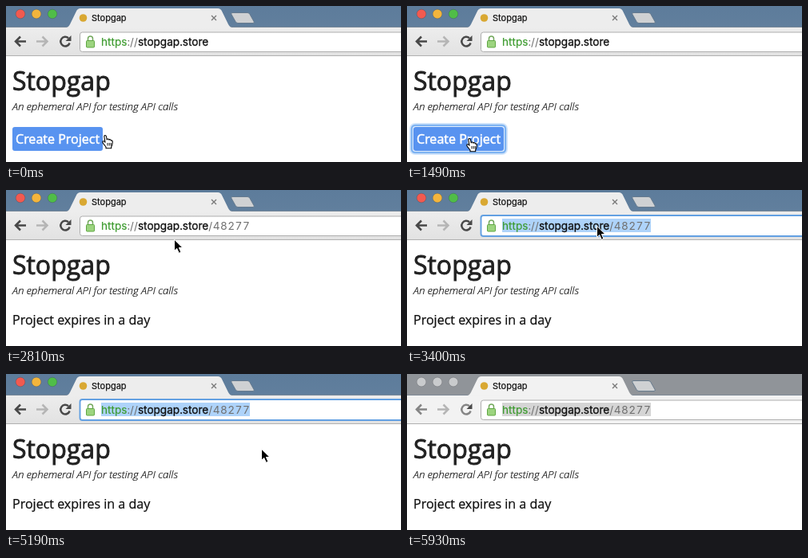
These frames come from a looping animation (494x196 px, 6.03 s). An HTML page:

```html
<!DOCTYPE html>
<html lang="en">
<head>
<meta charset="utf-8">
<title>Stopgap</title>
<style>
  html, body { margin: 0; width: 100%; height: 100%; overflow: hidden; background: #fff; }
  svg { display: block; width: 100%; height: 100%; }
  .ui { font-family: Inter, Roboto, sans-serif; }
  .page { font-family: "Open Sans", "Noto Sans", sans-serif; fill: #111; }
  .line { fill: none; stroke: #484848; stroke-width: 2.5; }
  .light { stroke: #000; stroke-opacity: .16; stroke-width: .9; }
  .idle .line { stroke: #858585; }
  .idle .light { fill: #c9cbcd; }
  .idle #frame { fill: #909499; }
  .idle #tab, .idle #bar { fill: #f2f2f2; }
  .idle #selection { fill: #d5d5d5; }
</style>
</head>
<body>
<svg id="stage" viewBox="0 0 494 196">
  <defs>
    <linearGradient id="sky" x2="0" y2="1">
      <stop stop-color="#5d7c9b"/><stop offset="1" stop-color="#617f9d"/>
    </linearGradient>
    <linearGradient id="chrome" x2="0" y2="1">
      <stop stop-color="#ededed"/><stop offset="1" stop-color="#e2e2e2"/>
    </linearGradient>
  </defs>

  <rect width="494" height="196" fill="#fff"/>
  <rect id="frame" width="494" height="28" fill="url(#sky)"/>
  <circle class="light" cx="18" cy="10" r="5.8" fill="#f25a50"/>
  <circle class="light" cx="38" cy="10" r="5.8" fill="#f3b53c"/>
  <circle class="light" cx="58" cy="10" r="5.8" fill="#50bd48"/>
  <path d="M283 8.5H302Q304 8.5 305 10.5L310 19.5Q311 21.5 309 21.500H290Q288 21.500 287 19.500L282 10.500Q281 8.500 283 8.500Z"
        fill="#cfd1d3" stroke="#60758a" stroke-width=".9"/>

  <rect id="bar" y="27" width="494" height="35" fill="url(#chrome)"/>
  <path d="M0 26.500H494" stroke="#7d8a97" stroke-width=".8"/>
  <path d="M0 62.500H494" stroke="#b0b0b0"/>
  <path id="tab" d="M74 27.500Q78 27 80 23L88 6.500Q89.500 3 93 3H265Q268.500 3 270 6.500L278 23Q280 27 284 27.500Z" fill="#ededed"/>
  <path d="M257 12l6 6m0-6l-6 6" stroke="#777" stroke-width="1.300"/>
  <text class="ui" x="107" y="19" font-size="11" fill="#111" stroke="#111" stroke-width=".2">Stopgap</text>
  <circle id="favicon" cx="96.500" cy="15" r="4.800" fill="#d9a832"/>
  <path id="blankIcon" d="M92.500 8.500h6l3.500 3.500v10h-9.500z" fill="#fff" stroke="#999" stroke-width=".8"/>
  <path id="spinner" d="M95.700 10A5.500 5.500 0 0 1 103.500 15" fill="none" stroke="#8c98b4" stroke-width="1.700"/>

  <path class="line" d="M25 44.500H12M18 38.500l-6 6 6 6"/>
  <path d="M38 44.500H51M45.500 38.500l6 6-6 6" fill="none" stroke="#b5b5b5" stroke-width="2.500"/>
  <g id="reload">
    <path class="line" d="M78 40.300A5.800 5.800 0 1 0 79.600 46.500"/>
    <path d="M81.500 37V44H74.500Z" fill="#484848"/>
  </g>
  <path id="stop" class="line" d="M69.500 39.500l10 10m0-10l-10 10"/>

  <rect id="address" x="92.500" y="33" width="420" height="24.500" rx="3" fill="#fff" stroke="#adadad"/>
  <rect id="focus" x="92.500" y="32" width="420" height="26" rx="3" fill="#fff" stroke="#62a0e2" stroke-width="1.900"/>
  <rect id="selection" x="119" y="36" width="186" height="17" fill="#aed3fa"/>
  <path d="M102.500 44.500V41a3 3 0 0 1 6 0V44.500" fill="none" stroke="#72a85c" stroke-width="1.500"/>
  <rect x="100.500" y="43.500" width="10" height="8.500" rx="1" fill="#9cd47f" stroke="#5fa743"/>
  <text class="ui" x="119" y="50" font-size="13.600" fill="#707070" style="font-variant-numeric:tabular-nums"><tspan fill="#3d9b2f" stroke="#3d9b2f" stroke-width=".2">https</tspan>://<tspan fill="#111" stroke="#111" stroke-width=".3">stopgap.store</tspan><tspan id="path" letter-spacing=".5">/48277</tspan></text>

  <g class="page">
    <text x="8" y="105.500" font-size="32" stroke="#222" stroke-width=".9" fill="#222">Stopgap</text>
    <text x="8" y="131" font-size="13.300" font-weight="300" font-style="italic" fill="#000" stroke="#000" stroke-width=".15">An ephemeral API for testing API calls</text>
    <text id="expiry" x="8" y="168.500" font-size="16.070" stroke="#111" stroke-width=".25"></text>
    <g id="button">
      <g id="ring" fill="none" stroke="#7fb4f2">
        <rect x="5" y="149" width="119" height="36" rx="5" stroke-width="4" opacity=".35"/>
        <rect x="6" y="150" width="117" height="34" rx="4" stroke-width="2.500"/>
      </g>
      <rect x="8" y="152" width="113" height="30" rx="3" fill="#5893f0"/>
      <text x="12" y="173" font-size="16.070" fill="#fff" stroke="#fff" stroke-width=".5">Create Project</text>
    </g>
  </g>

  <g id="cursor">
    <path id="arrow" d="M1.500 .2V14.400L4.700 11.400L7.300 17.300L9.900 16.200L7.400 10.500H11.900Z" fill="#000" stroke="#fff" stroke-width="1"/>
    <path id="beam" d="M1 .7Q3.500 .7 3.500 2.500Q3.500 .7 6 .7M3.500 2.500V14.500M1 16.300Q3.500 16.300 3.500 14.500Q3.500 16.300 6 16.300M2.200 10.500H4.800" fill="none" stroke="#222"/>
    <g id="hand" stroke="#000" stroke-linejoin="round">
      <path d="M6 16.800V15L2.300 10.300Q1.200 8.300 2.600 7.800Q3.800 7.500 5 9.300L3.900 2.500Q3.600 .6 4.900 .5Q6.200 .5 6.500 2L7.200 6Q7.500 4.800 8.700 5Q9.700 5.200 9.800 6.300Q10.300 5.400 11.400 5.800Q12.200 6.200 12.300 7.200Q13 6.600 13.800 7.200Q14.500 8 14.200 10L13.700 12.700L12.700 14.800V16.800Z" fill="#fff" stroke-width="1.100"/>
      <path d="M8 10V13.500M10.200 10V13.500M12.200 10V13.500" stroke-width=".9"/>
    </g>
  </g>
</svg>

<script>
const LOOP = 6030;
const el = id => document.getElementById(id);
const show = (id, on) => { el(id).style.display = on ? "" : "none"; };

// start time, shape, left, top
const cursorSteps = [
  [0, "hand", 119, 162], [150, "hand", 95, 162], [440, "hand", 83, 164],
  [590, "hand", 73, 166], [2520, "beam", 75, 154], [2660, "arrow", 128, 104],
  [2810, "arrow", 209, 62], [2960, "beam", 235, 40], [3110, "beam", 235, 39],
  [3250, "arrow", 236, 45], [5190, "arrow", 318, 94], [5340, "arrow", 428, 137],
  [5480, "arrow", 442, 174], [5630, "none", 0, 0]
];
// start time, rotation
const spinnerSteps = [[1640, 180], [1780, 90], [1930, 0], [2080, 120]];
const latest = (steps, t) => steps.filter(step => step[0] <= t).pop() || steps[0];

function draw(t) {
  const within = (from, to = LOOP) => t >= from && t < to;
  const created = within(1930);
  const loading = within(1640, 2220);
  const idle = within(5930);

  show("button", !created);
  show("ring", within(1490));
  show("path", created);
  el("expiry").textContent = !created ? "" :
    "Project expires " + (t < 2080 ? "2016-07-25 00:40:20 UTC" : "in a day");

  show("stop", loading);
  show("reload", !loading);
  show("spinner", loading);
  show("blankIcon", within(2220, 2370));
  show("favicon", !within(1640, 2370));
  el("spinner").setAttribute("transform", `rotate(${latest(spinnerSteps, t)[1]} 98 15)`);

  show("focus", within(3250) && !idle);
  show("selection", within(3250));
  el("stage").classList.toggle("idle", idle);

  const [, shape, x, y] = latest(cursorSteps, t);
  for (const id of ["hand", "beam", "arrow"]) show(id, id === shape);
  el("cursor").setAttribute("transform", `translate(${x} ${y})`);
}

const start = performance.now();
function tick() {
  draw((performance.now() - start) % LOOP);
  requestAnimationFrame(tick);
}
tick();
</script>
</body>
</html>
```
